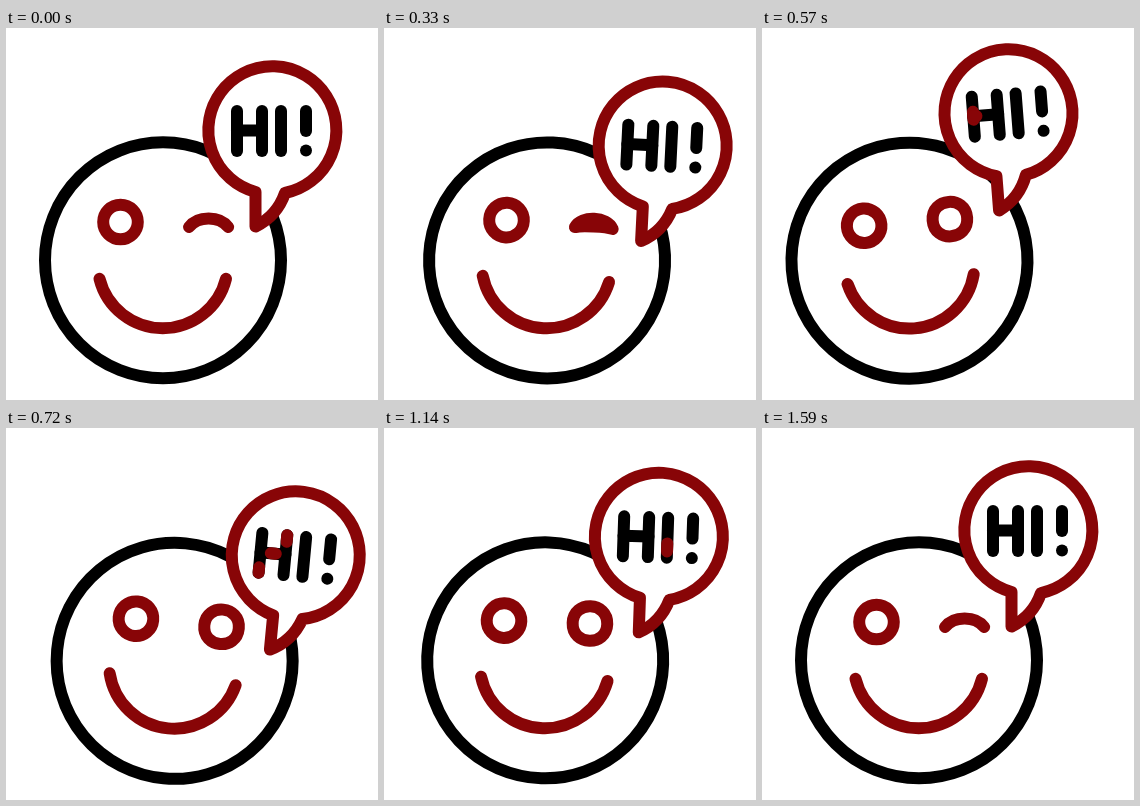
Recreate the animation shown at these times as an HTML page. Size 372 px wide and 372 px high, loop 2100 ms.

```html
<!DOCTYPE html>
<html lang="en">
<head>
<meta charset="utf-8">
<title>Winking greeting</title>
<style>
  html, body { margin: 0; width: 100%; height: 100%; overflow: hidden; background: #fff; }
  svg { display: block; width: 100vw; height: 100vh; }
  path, circle { fill: none; stroke-width: 12; stroke-linecap: round; stroke-linejoin: round; }
  .ink { stroke: #000; }
  .red { stroke: #880507; }
  .paper { fill: #fff; }
</style>
</head>
<body>
<svg viewBox="0 0 372 372">
  <g id="face">
    <circle class="ink" cx="157" cy="232.3" r="118"/>
    <circle class="red" cx="114.5" cy="194" r="17.3"/>
    <path class="red" d="M93.5 250.8A65.2 65.2 0 0 0 220 250.8"/>
    <path class="red" id="eye"/>
  </g>
  <g id="bubble">
    <path class="red paper" d="M249.5 164V198.5Q271 188 279 165A64 64 0 1 0 249.5 164Z"/>
    <g id="letters"></g>
  </g>
</svg>
<script>
const LOOP = 2100, STEP = 30;
const BEAT = 240, END = 1590;      // time between swing peaks, time of rest
const LAG = 15;                    // the bubble trails the head
const SWEEP = 370, DASH = 0.2;     // red run along one stroke
const $ = id => document.getElementById(id);

// Peaks of the swing, one per beat; the last stretch settles until END
const tiltPeaks = [0, 8, -8.8, 5.4, -2.5, 2.7, 0];
const bobPeaks = [0, 17, -16, 14, -7.5, 5.5, 0];

const clamp = v => Math.min(1, Math.max(0, v));
const lerp = (a, b, p) => a + (b - a) * p;
const ramp = (t, a, b) => (1 - Math.cos(Math.PI * clamp((t - a) / (b - a)))) / 2;

function swing(peaks, t) {
  const last = peaks.length - 2;
  const i = Math.min(last, Math.max(0, Math.floor(t / BEAT)));
  const to = i === last ? END : (i + 1) * BEAT;
  return lerp(peaks[i], peaks[i + 1], ramp(t, i * BEAT, to));
}

const stem = (x, y1 = 83, y2 = 123) => [x, y1, x, y2];
const strokes = [
  stem(231), stem(256), [231, 102.5, 256, 102.5],
  stem(275),
  stem(300, 83, 103), stem(300, 122.5, 122.5)
];

function line([x1, y1, x2, y2], a = 0, b = 1) {
  return `M${lerp(x1, x2, a)} ${lerp(y1, y2, a)}L${lerp(x1, x2, b)} ${lerp(y1, y2, b)}`;
}

function addPath(cls, d) {
  const el = document.createElementNS("http://www.w3.org/2000/svg", "path");
  el.setAttribute("class", cls);
  el.setAttribute("d", d);
  $("letters").append(el);
  return el;
}

strokes.forEach(s => addPath("ink", line(s)));
const runs = strokes.map(s => addPath("red", line(s)));

// The red run starts later the further right a stroke stands
const runStart = ([x1, , x2]) => 392 + 11.1 * ((x1 + x2) / 2 - 231);

// open = 0 is a single arc (wink), open = 1 is a ring
function eyePath(open) {
  const x = lerp(202.6, 200.5, open), y = lerp(199, 194, open);
  const w = lerp(19.5, 17.3, open), c = lerp(11, 17.3, open);
  const top = y - lerp(11.5, 23, open * open), low = y + lerp(-11.5, 23, open);
  return `M${x - w} ${y}C${x - c} ${top} ${x + c} ${top} ${x + w} ${y}` +
         `C${x + c} ${low} ${x - c} ${low} ${x - w} ${y}Z`;
}

function draw(t) {
  const turn = `rotate(${swing(tiltPeaks, t)} 157 356)`;
  $("face").setAttribute("transform", turn);
  $("bubble").setAttribute("transform", `translate(0 ${swing(bobPeaks, t - LAG)}) ${turn}`);
  $("eye").setAttribute("d", eyePath(ramp(t, 260, 460) - ramp(t, 1220, 1420)));

  runs.forEach((el, i) => {
    const p = (t - runStart(strokes[i])) / SWEEP;
    const head = p * (1 + DASH);
    el.style.display = p > 0 && p < 1 ? "" : "none";
    el.setAttribute("d", line(strokes[i], clamp(head - DASH), clamp(head)));
  });
}

const start = performance.now();
function tick() {
  const t = (performance.now() - start) % LOOP;
  draw(Math.min(END, Math.floor(t / STEP) * STEP));
  requestAnimationFrame(tick);
}
tick();
</script>
</body>
</html>
```
